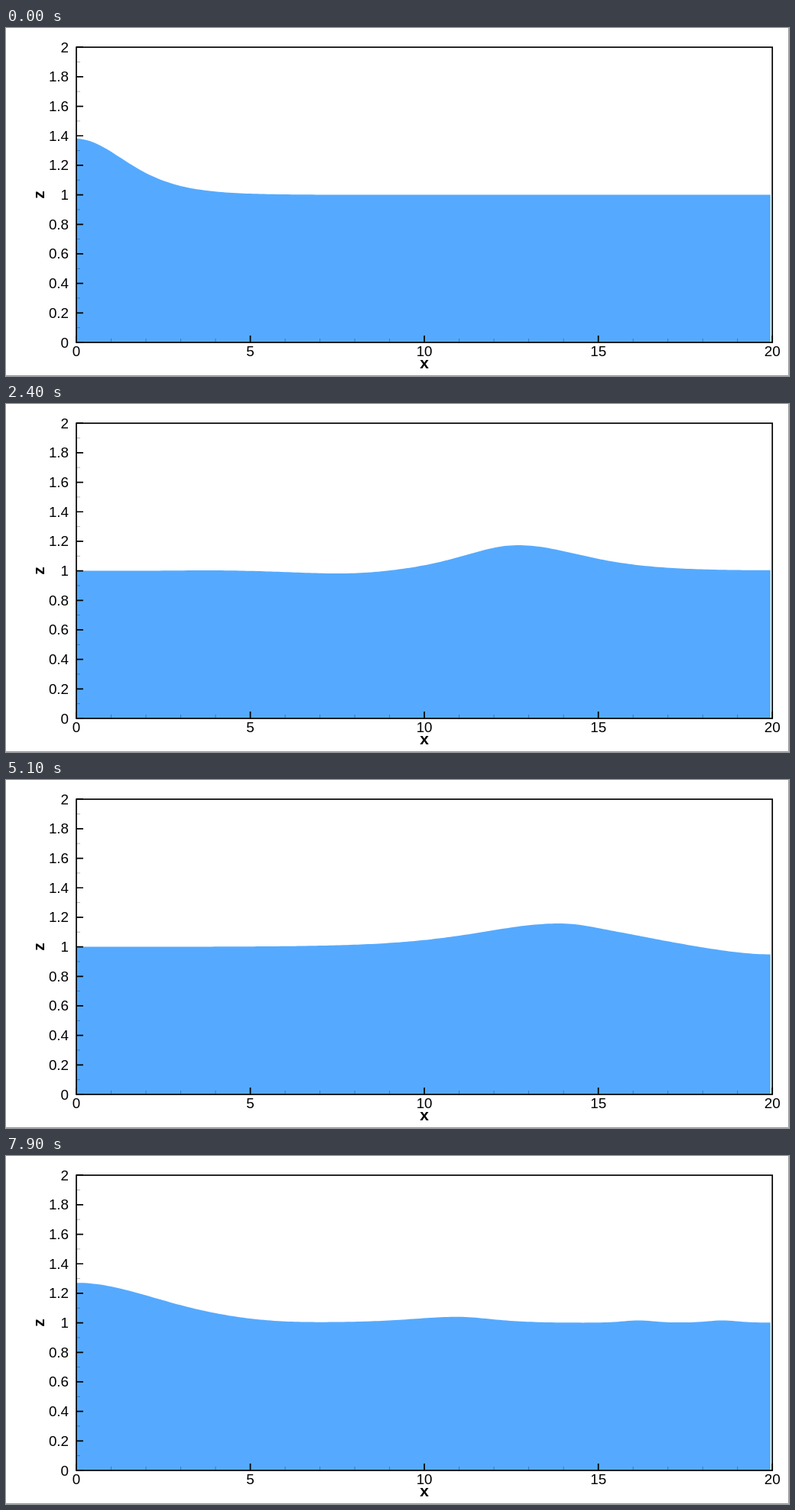
Write an HTML page that moves like this. It is 1024 px wide and 456 px high and loops after 8000 ms.

```html
<!DOCTYPE html>
<html lang="en">
<head>
<meta charset="utf-8">
<title>Wave in a tank</title>
<style>
html, body { margin: 0; width: 100%; height: 100%; overflow: hidden; background: #fff; }
svg { display: block; width: 100%; height: 100%; }
text { font: 18.8px "Liberation Sans", Arial, sans-serif; text-anchor: middle; }
.end { text-anchor: end; }
.name { font-size: 21px; font-weight: bold; }
.major, .frame { stroke: #000; stroke-width: 1.7; fill: none; }
.minor { stroke: #000; stroke-opacity: .5; stroke-width: .6; fill: none; }
</style>
</head>
<body>
<svg viewBox="0 0 1024 456">
  <path d="M0 455.5H1023.5V0" fill="none" stroke="#999"/>
  <path id="water" fill="#55aaff"/>
  <g id="axes"></g>
  <rect class="frame" x="92" y="25.2" width="910.2" height="386.8"/>
  <text class="name" x="547" y="445.5">x</text>
  <text class="name" transform="translate(50.3 218.5) rotate(-90)">z</text>
</svg>
<script>
const LEN = 20, LOOP = 8000, STEP = 100;
const px = x => 92 + 45.51 * x;
const py = z => 412 - 193.4 * z;
const bell = u => Math.exp(-u * u);

// A hump with its own sharpness on the front and back slopes.
const hump = (pos, height, front, back = front) => s => {
  const d = s - pos;
  return height / Math.cosh(d * (d > 0 ? front : back)) ** 2;
};

// Positions run on past the walls and are folded back into the tank.
function surface(t) {
  const bounce = bell((t - 4.9) / .8);
  const crest = 5.33 * t - .02 * t * t - .55 * bounce;
  const waves = [
    hump(crest, .19 - .0065 * Math.min(t, 6.2),
      .337 + .188 * Math.exp(-t / 2.2) - .04 * bounce,
      .525 - .02 * t + .04 * bounce),
    hump(crest - 4.1 - .3 * t, -.032 * Math.sin(Math.PI * t / 9), .5),
    hump(4.55 * t - 6.9, .04 * Math.min(1, t / 7) ** 2, .55, .75),
    hump(22.2 + 2.8 * (t - 4.1), -.016 * bell((t - 4.1) / .5), 1)
  ];
  // Short ripples shed by the right wall
  for (let born = 6.15; born < t; born += 1.1) {
    const age = t - born;
    waves.push(hump(LEN + 2.2 * age, .016 * Math.min(1, 4 * age), 1.6));
  }
  const rise = s => waves.reduce((sum, wave) => sum + wave(s), 0);
  return x => 1 + rise(x) + rise(-x) + rise(2 * LEN - x) + rise(2 * LEN + x);
}

const water = document.getElementById("water");

function draw(ms) {
  const level = surface(Math.floor(ms % LOOP / STEP) * STEP / 1000);
  let d = "M92 412";
  for (let i = 0; i <= 200; i++) {
    const x = i * 19.945 / 200;
    d += `L${px(x).toFixed(2)} ${py(level(x)).toFixed(2)}`;
  }
  water.setAttribute("d", d + "V412Z");
}

function buildAxes() {
  let major = "", minor = "", labels = "";
  for (let i = 0; i <= 20; i++) {
    const x = px(i), y = py(i / 10);
    if (i % 5) minor += `M${x} 412v-5`;
    else {
      major += `M${x} 412v-9`;
      labels += `<text x="${x}" y="430">${i}</text>`;
    }
    if (i % 2) minor += `M92 ${y}h5`;
    else {
      major += `M92 ${y}h9`;
      labels += `<text class="end" x="82" y="${y + 6.5}">${i / 10}</text>`;
    }
  }
  document.getElementById("axes").innerHTML =
    `<path class="minor" d="${minor}"/><path class="major" d="${major}"/>${labels}`;
}

buildAxes();
const start = performance.now();
function tick(now) {
  draw(Math.max(0, now - start));
  requestAnimationFrame(tick);
}
tick(start);
</script>
</body>
</html>
```
